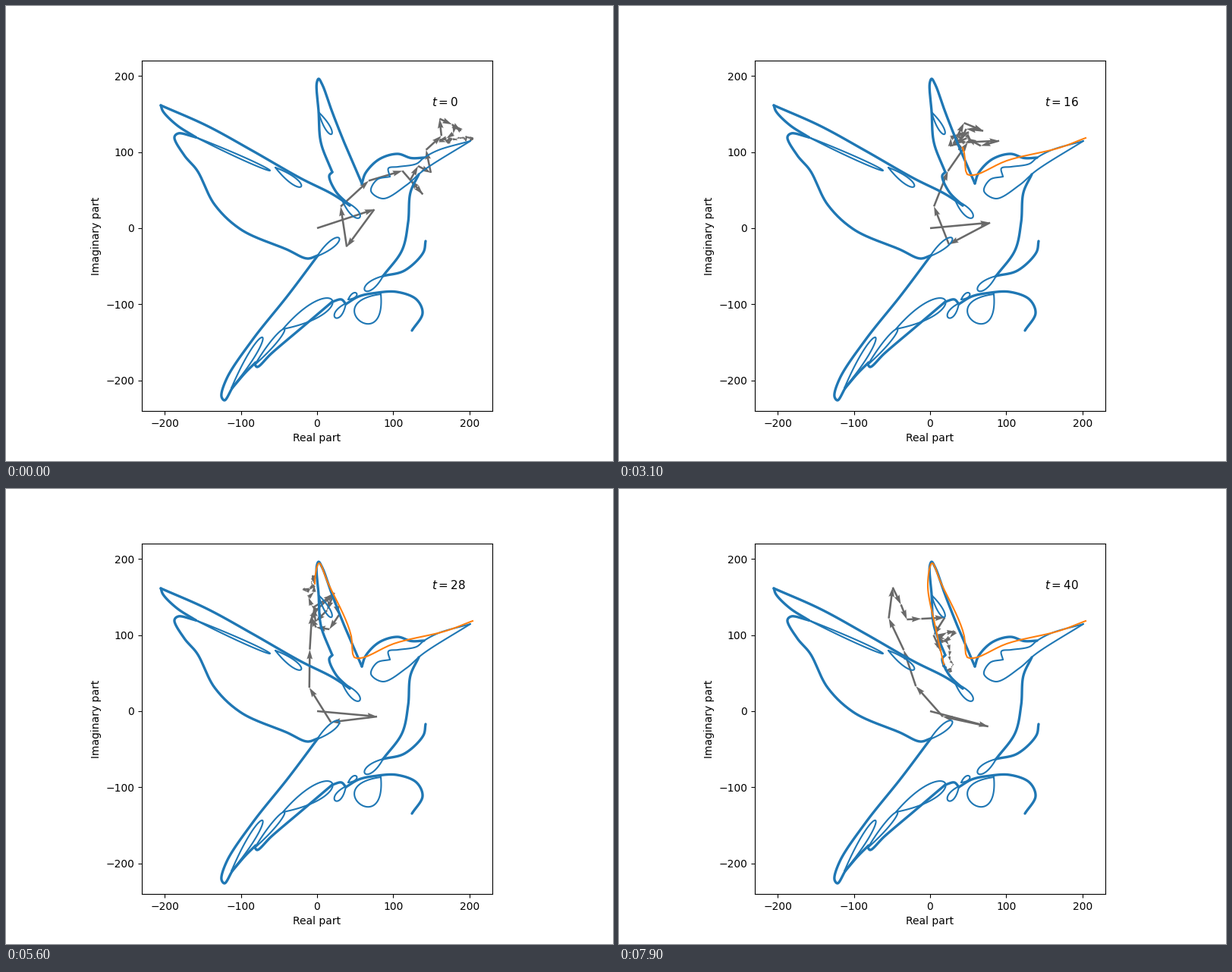
A matplotlib script that plays this animation: 800x600 px, repeating every 8000 ms.

```python
import numpy as np
import matplotlib.pyplot as plt
from matplotlib.animation import FuncAnimation

FRAMES, INTERVAL = 80, 100
OMEGA = np.radians(0.417)     # base rotation per frame
SCALE = 462 / 460             # pixels per data unit
steps = np.arange(FRAMES)


def to_plane(points):
    """Stage pixels to complex data coordinates."""
    x, y = np.array(points, float).T
    return (x - 410) / SCALE + 1j * (292.96 - y) / SCALE


def spline(z, u, at):
    """Smooth Hermite curve through z at knots u."""
    m = np.gradient(z, u)
    i = np.clip(np.searchsorted(u, at, side="right") - 1, 0, len(u) - 2)
    h = u[i + 1] - u[i]
    s = (at - u[i]) / h
    return ((2*s**3 - 3*s**2 + 1) * z[i] + (s**3 - 2*s**2 + s) * h * m[i]
            + (3*s**2 - 2*s**3) * z[i + 1] + (s**3 - s**2) * h * m[i + 1])


def curve(points):
    z = to_plane(points)
    u = np.r_[0, np.cumsum(np.sqrt(np.abs(np.diff(z))))]
    return spline(z, u, np.linspace(0, u[-1], 16 * len(z)))


def leaf(base, tip, width):
    """Closed teardrop, pointed at its base."""
    a, b = to_plane([base, tip])
    th = np.linspace(0, 2 * np.pi, 60)
    side = 0.65 * width * np.sin(th) * np.sin(th / 2)
    return a + (b - a) * ((1 - np.cos(th)) / 2 + 1j * side / abs(b - a))


def draw(ax, z, width):
    ax.plot(z.real, z.imag, color="tab:blue", lw=width,
            solid_capstyle="round", solid_joinstyle="round")


def draw_bird(ax):
    body = [
        # head and far wing
        [(551, 200), (534, 200.5), (516, 195), (492, 202), (474, 220),
         (469, 234)],
        [(469, 234), (447, 183), (430, 140), (417, 104), (412, 96),
         (409.5, 102), (412, 139), (415, 180), (430, 219)],
        [(430, 219), (426, 224), (435, 245), (453, 263)],
        # near wing
        [(453, 263), (430, 248), (388, 227), (325, 191), (265, 158),
         (204, 131)],
        [(204, 131), (207, 139), (225, 157), (250, 173)],
        [(250, 173), (227, 168), (222, 173), (235, 197), (252, 217),
         (275, 262), (310, 295), (370, 321), (397, 333), (411, 329)],
        # back and tail
        [(411, 329), (372, 381), (325, 440), (291, 491), (284, 515),
         (288, 520), (298, 504)],
        [(298, 504), (315, 484), (329, 470)],
        [(328, 473), (331, 476), (350, 458), (390, 424), (430, 390)],
        # legs, belly and chest
        [(430, 390), (442, 387), (448, 393)],
        [(448, 393), (465, 383), (486, 378.5), (515, 377), (541, 387),
         (549, 405), (535, 428)],
        [(553, 310), (550, 325), (525, 349), (497, 356)],
        [(497, 356), (522, 322), (530, 285), (533, 246), (544, 222)],
    ]
    beak = [
        [(612, 178), (570, 190), (551, 200), (541, 208), (517, 212),
         (504, 214), (506, 225)],
        [(506, 225), (489, 229), (481, 244), (497, 254), (528, 236),
         (550, 217), (612, 178)],
    ]
    leaves = [
        # wings
        ((412, 140), (429, 169), 7), ((250, 173), (348, 217), 4),
        ((355, 213), (389, 238), 9), ((443, 256), (466, 279), 10),
        ((410, 330), (439, 306), 9),
        # tail
        ((297, 504), (338, 437), 9), ((328, 473), (367, 426), 7),
        ((365, 426), (430, 388), 20),
        # feet
        ((448, 392), (434, 411), 9), ((451, 387), (462, 379), 6),
        ((494, 380), (466, 415), 33), ((497, 356), (473, 375), 10),
    ]
    for points in body:
        draw(ax, curve(points), 2.4)
    for points in beak:
        draw(ax, curve(points), 1.5)
    for args in leaves:
        draw(ax, leaf(*args), 1.5)


def spin(freqs):
    return np.exp(1j * OMEGA * np.outer(steps, freqs))


def small_arrows(gap, used, seed, count=50):
    """Random shrinking terms, bent so that their sum follows gap."""
    rng = np.random.default_rng(seed)
    freqs = [k for n in range(1, 40) for k in (n, -n) if k not in used]
    size = 17 * 0.9 ** np.arange(count)
    start = size * np.exp(2j * np.pi * rng.random(count))
    a = spin(freqs[:count])
    aw = (a * size**2).conj().T
    coef = start + aw @ np.linalg.solve(a @ aw + 0.6 * np.eye(FRAMES),
                                        gap - a @ start)
    return (a * coef)[:, np.argsort(-np.abs(coef))]


def spread(arrows):
    """Mean distance of the joints from the end of the chain."""
    joints = np.cumsum(arrows, axis=1)
    return np.abs(joints - joints[:, -1:]).mean()


# pen: frame, x, y
PEN = np.array([
    (0, 615, 174), (8, 577, 188), (17, 511, 204), (24, 467, 223),
    (26, 459, 222), (30, 455, 194), (40, 424, 123), (47, 413.5, 98),
    (57, 407, 129), (68, 417, 182), (79, 428, 231)])
pen = spline(to_plane(PEN[:, 1:]), PEN[:, 0], steps.astype(float))

# large arrows: frequency, length, start angle in degrees
freq, length, angle = np.array([
    (-1, 79, 18.2), (-2, 61, 233.7), (1, 53.5, 98.6), (2, 50, 42.6),
    (3, 46, 16.5), (4, 41, -49), (5, 25, 131), (7, 21, 61),
    (-10, 19, -28)]).T
large = spin(freq) * length * np.exp(1j * np.radians(angle))
gap = pen - large.sum(axis=1)
small = min((small_arrows(gap, set(freq), s) for s in range(80)), key=spread)
arrows = np.hstack([large, small])
tails = np.cumsum(arrows, axis=1) - arrows

fig, ax = plt.subplots(figsize=(8, 6), dpi=100)
draw_bird(ax)
trace, = ax.plot([], [], color="tab:orange", lw=1.5)
quiver = ax.quiver(tails[0].real, tails[0].imag, arrows[0].real,
                   arrows[0].imag, color="dimgray", scale=1,
                   scale_units="xy", units="width", width=0.0055)
label = ax.text(150, 160, "", fontsize=11)
ticks = range(-200, 201, 100)
ax.set(aspect="equal", xlim=(-230, 230), ylim=(-240, 220), xticks=ticks,
       yticks=ticks, xlabel="Real part", ylabel="Imaginary part")


def update(i):
    path = pen[:i + 1]
    trace.set_data(path.real, path.imag)
    quiver.set_offsets(np.column_stack([tails[i].real, tails[i].imag]))
    quiver.set_UVC(arrows[i].real, arrows[i].imag)
    label.set_text(f"$t = {round(i * 100 / 199)}$")
    return trace, quiver, label


anim = FuncAnimation(fig, update, frames=FRAMES, interval=INTERVAL,
                     init_func=lambda: update(0), repeat=True,
                     repeat_delay=0, blit=False)
plt.show()
```
